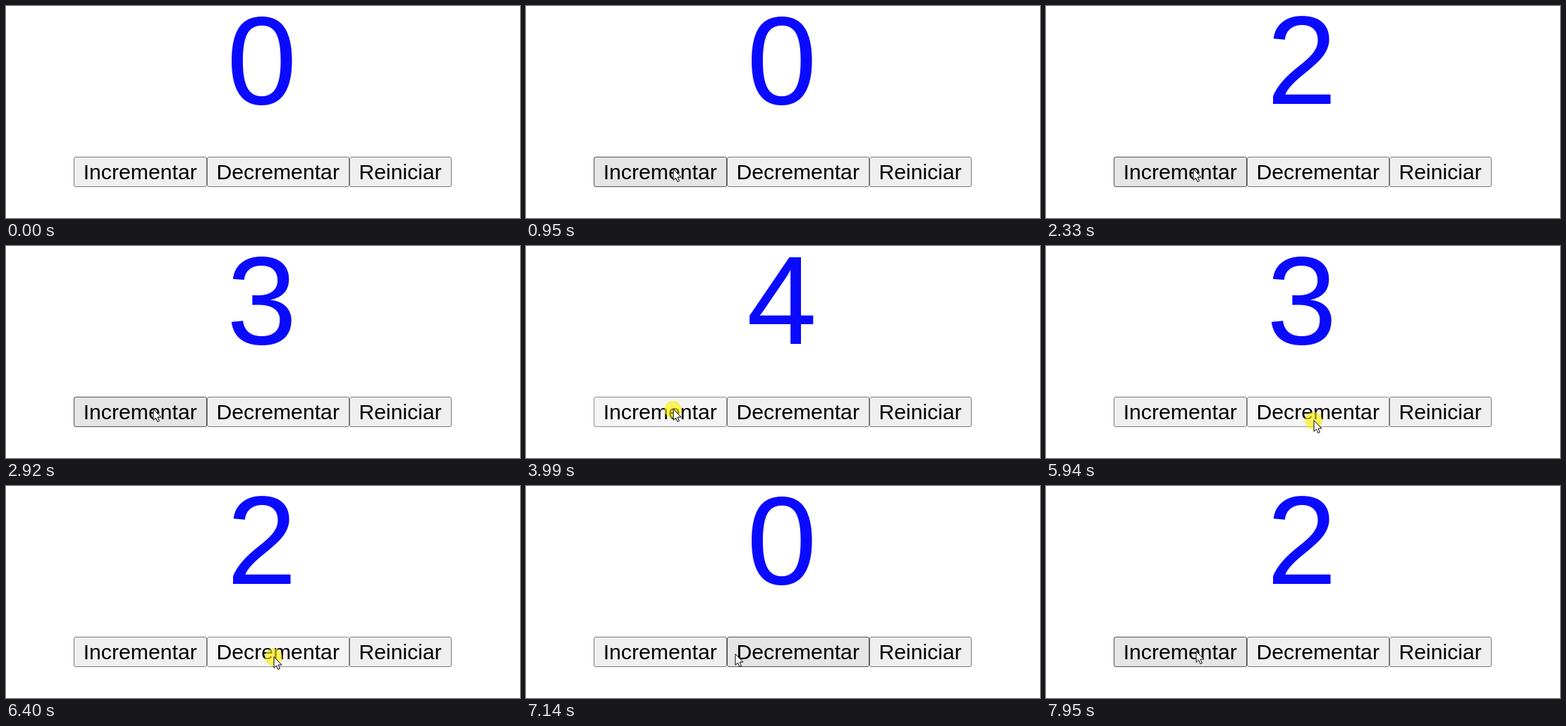
Recreate the animation shown at these times as an HTML page. Size 729 by 301 pixels, loop 8000 ms.

```html
<!DOCTYPE html>
<html lang="es">
<head>
<meta charset="utf-8">
<title>Contador</title>
<style>
  html, body { margin: 0; width: 100%; height: 100%; overflow: hidden; background: #fff; }
  svg { display: block; width: 729px; height: 301px; }
  text { font-family: Arial, "Liberation Sans", sans-serif; text-anchor: middle; }
  #count { font-size: 179px; fill: #0a0aff; }
  .button text { font-size: 30.2px; fill: #000; }
  .button rect { fill: #efefef; stroke: #767676; }
  .button.hover rect { fill: #e5e5e5; stroke: #4f4f4f; }
  .button.active rect { fill: #f5f5f5; stroke: #8d8d8d; }
  #press { fill: #fff000; fill-opacity: .62; }
  #arrow { fill: #fff; stroke: #000; }
</style>
</head>
<body>
<svg viewBox="0 0 729 301">
  <text id="count" x="362.7" y="138.8">0</text>
  <g id="buttons"></g>
  <g id="pointer">
    <circle id="press" cx="-.5" cy="1" r="12.3"/>
    <path id="arrow" d="M0 .5V16.3L3.5 13 5.9 18.5 8.4 17.4 6 12H11Z"/>
  </g>
</svg>
<script>
const LOOP = 8000, STEP = 70, HOLD = 100;
const LEFT = 96, TOP = 214, HEIGHT = 43;
const ENTRY = { x: 350, y: 273 };

// Each act: the pointer travels to a spot, then clicks there at an even pace.
const ACTS = [
  { start: 390, travel: 560, x: 209, y: 231, press: 1480, gap: 627, clicks: 5, delta: 1 },
  { start: 4250, travel: 560, x: 380, y: 247, press: 4880, gap: 530, clicks: 3, delta: -1 },
  { start: 6130, travel: 140, x: 380, y: 242, press: 6400, gap: 400, clicks: 2, delta: -1 },
  { start: 6930, travel: 420, x: 213, y: 234, press: 7420, gap: 400, clicks: 2, delta: 1 }
];

const byId = id => document.getElementById(id);
const count = byId("count"), pointer = byId("pointer"), press = byId("press");

function svg(name, attrs, parent) {
  const el = document.createElementNS("http://www.w3.org/2000/svg", name);
  for (const key in attrs) el.setAttribute(key, attrs[key]);
  return parent.appendChild(el);
}

let edge = LEFT;
function addButton(label, width) {
  const left = edge;
  edge += width;
  const el = svg("g", { class: "button" }, byId("buttons"));
  svg("rect", { x: left + .5, y: TOP + .5, rx: 2.5, width: width - 1, height: HEIGHT - 1 }, el);
  svg("text", { x: left + width / 2 - .3, y: TOP + 32 }, el).textContent = label;
  return { el, left, right: edge };
}
const buttons = [
  addButton("Incrementar", 189),
  addButton("Decrementar", 202),
  addButton("Reiniciar", 145)
];

const clamp = (v, lo, hi) => Math.max(lo, Math.min(hi, v));
const ease = p => p * p * (3 - 2 * p);

// The pointer advances in discrete steps along each eased move.
function pointerAt(t) {
  const i = Math.max(0, ACTS.findLastIndex(act => t >= act.start));
  const from = ACTS[i - 1] || ENTRY, to = ACTS[i];
  const walked = Math.floor((t - to.start) / STEP) * STEP;
  const p = ease(clamp(walked / to.travel, 0, 1));
  const mix = (a, b) => Math.round(a + (b - a) * p);
  return { x: mix(from.x, to.x), y: mix(from.y, to.y) };
}

// A click counts when it is released.
function clicksAt(t) {
  let total = 0, pressed = false;
  for (const act of ACTS) {
    for (let i = 0; i < act.clicks; i++) {
      const age = t - act.press - i * act.gap;
      if (age >= HOLD) total += act.delta;
      else if (age >= 0) pressed = true;
    }
  }
  return { total, pressed };
}

function draw(t) {
  const { x, y } = pointerAt(t);
  const { total, pressed } = clicksAt(t);
  const shown = t >= ACTS[0].start;

  count.textContent = total;
  pointer.setAttribute("visibility", shown ? "visible" : "hidden");
  pointer.setAttribute("transform", `translate(${x} ${y})`);
  press.style.display = pressed ? "" : "none";

  for (const b of buttons) {
    const over = shown && x >= b.left && x < b.right && y >= TOP && y < TOP + HEIGHT;
    b.el.classList.toggle("hover", over);
    b.el.classList.toggle("active", over && pressed);
  }
}

const origin = performance.now();
function tick() {
  draw((performance.now() - origin) % LOOP);
  requestAnimationFrame(tick);
}
tick();
</script>
</body>
</html>
```
